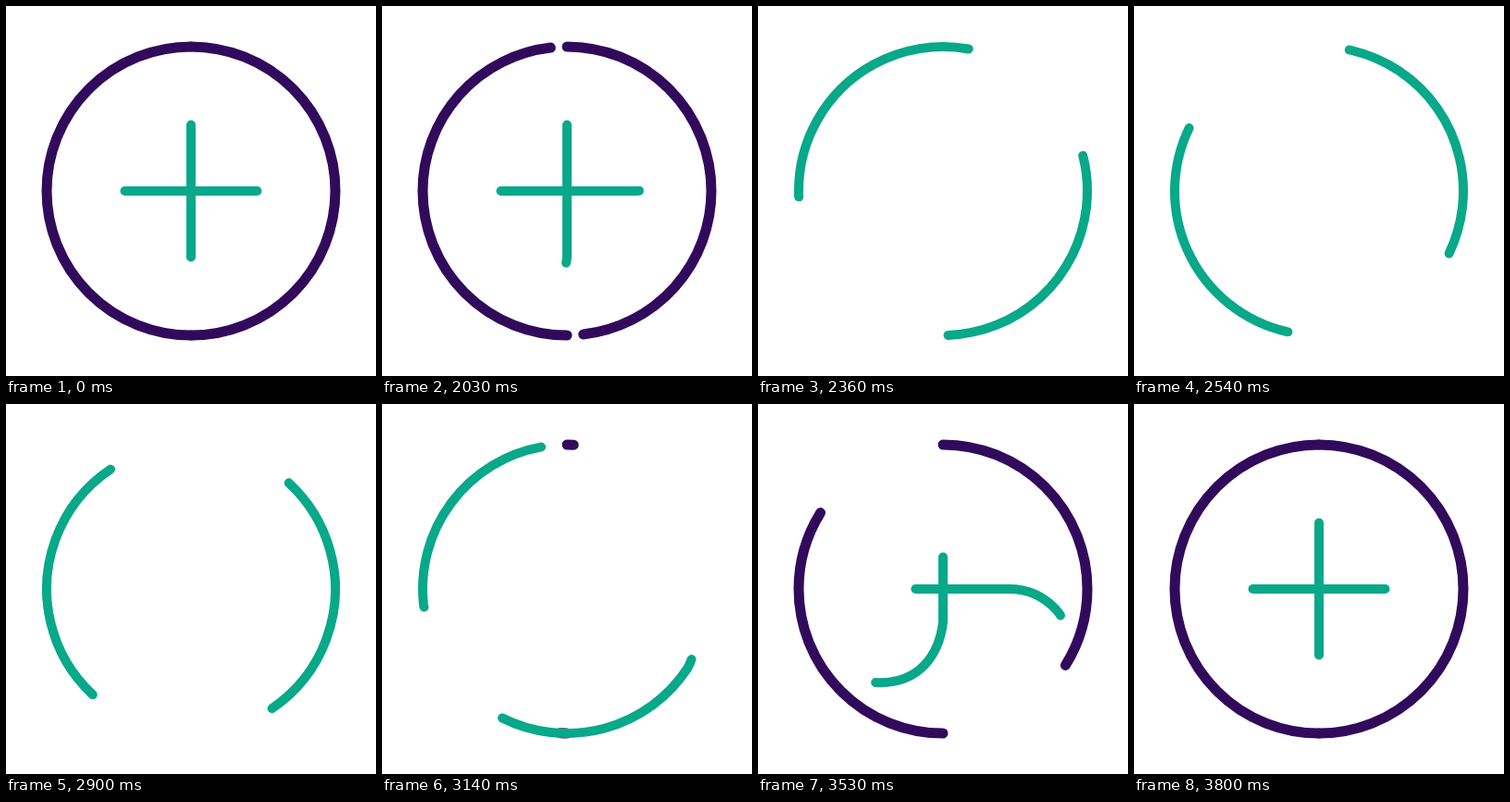
An HTML page that plays this animation: 400x400 px, repeating every 3.83 s.

```html
<!DOCTYPE html>
<html lang="en">
<head>
<meta charset="utf-8">
<title>Plus in a circle</title>
<style>
  html, body { margin: 0; width: 100%; height: 100%; overflow: hidden; background: #fff; }
  svg { display: block; width: 100vw; height: 100vh; }
  path { fill: none; stroke-linecap: round; stroke-linejoin: round; }
  .ring { stroke: #320a5c; stroke-width: 11; }
  .strand { stroke: #08a88a; stroke-width: 10; }
</style>
</head>
<body>
<svg viewBox="0 0 400 400">
  <path class="ring" d="M200 44A156 156 0 0 1 200 356">
  </path>
  <path class="ring" d="M200 356A156 156 0 0 1 200 44"></path>
  <path class="strand"></path>
  <path class="strand"></path>
</svg>
<script>
const LOOP = 3830, HOLD = 2030, STEP = 30, LAST = 60;
const R = 156, RAD = Math.PI / 180, BAR = 143;
const TIMES = [0, 1, 12, 18, 30, 44, LAST];

const rings = document.querySelectorAll('.ring');
const strands = document.querySelectorAll('.strand');
const clamp = x => Math.min(1, Math.max(0, x));
const smooth = x => { x = clamp(x); return x * x * (3 - 2 * x); };

// Angles are clockwise from the top.
const rim = deg => `${200 + R * Math.sin(deg * RAD)} ${200 - R * Math.cos(deg * RAD)}`;

// Counterclockwise run along the rim, in pieces of at most 90 degrees.
function orbit(from, sweep) {
  const n = Math.ceil(sweep / 90);
  let d = '';
  for (let i = 1; i <= n; i++) d += `A${R} ${R} 0 0 0 ${rim(from - sweep * i / n)}`;
  return d;
}

function pathLength(d) {
  const p = document.createElementNS('http://www.w3.org/2000/svg', 'path');
  p.setAttribute('d', d);
  return p.getTotalLength();
}

// Smooth monotone curve through the keys, at rest at both ends.
function through(values, k) {
  const last = TIMES.length - 1;
  let i = 0;
  while (i < last - 1 && k > TIMES[i + 1]) i++;
  const slope = j => (values[j + 1] - values[j]) / (TIMES[j + 1] - TIMES[j]);
  const tangent = j => {
    if (j === 0 || j === last) return 0;
    const a = slope(j - 1), b = slope(j);
    return a * b > 0 ? 2 * a * b / (a + b) : 0;
  };
  const h = TIMES[i + 1] - TIMES[i], u = (k - TIMES[i]) / h, w = 1 - u;
  return values[i] * w * w * (1 + 2 * u) + values[i + 1] * u * u * (3 - 2 * u)
       + h * u * w * (w * tangent(i) - u * tangent(i + 1));
}

// The curve into the upright bar straightens as m goes from 0 to 1.
function intoUpright(m) {
  const p = (x0, y0, x1, y1) => `${x0 + (x1 - x0) * m} ${y0 + (y1 - y0) * m} `;
  return 'C50 245 ' + p(60, 278, 100, 316) + p(105, 280, 150, 322)
       + 'C' + p(165, 282, 185, 325) + p(192, 240, 200, 300) + p(200, 200, 200, 271.5)
       + 'L200 128.5';
}

const intoLevel = () => 'C342 266 338 240 322 222C308 207 290 200 271.5 200L128.5 200';

// turns: degrees travelled on the rim at keys 12, 18 and 30
const routes = [
  {
    open: `M128.5 200L271.5 200C290 200 308 193 322 178C338 160 342 134 ${rim(56.5)}`,
    join: 56.5, sweep: 512.5, close: intoUpright,
    head: [148.7, 223.9, 373.6], tail: [46.2, 120.5, 270.5],
    left: 108, leave: 512.5
  },
  {
    open: `M200 128.5L200 271.5C197 300 170 355 ${rim(180)}`,
    join: 180, sweep: 416.5, close: intoLevel,
    head: [104.1, 167.8, 316.9], tail: [2, 64.3, 213.8],
    left: 115.5, leave: 399.3
  }
];
for (const r of routes) {
  r.base = pathLength(r.open);
  r.body = r.open + orbit(r.join, r.sweep);
}

function trim(path, from, to) {
  path.style.visibility = to > from ? 'visible' : 'hidden';
  path.setAttribute('stroke-dasharray', `${Math.max(0, to - from)} 9999`);
  path.setAttribute('stroke-dashoffset', -from);
}

function drawStrand(path, r, k) {
  path.setAttribute('d', r.body + r.close(smooth((k - 44) / 14)));
  const total = path.getTotalLength();
  const at = deg => r.base + deg * RAD * R;
  const head = [BAR, BAR + 6.5, ...r.head.map(at), total - r.left, total];
  const tail = [0, 0, ...r.tail.map(at), at(r.leave), total - BAR];
  trim(path, through(tail, k), through(head, k));
}

function draw(now) {
  const t = now % LOOP;
  let k = t < HOLD ? 0 : Math.min(LAST, Math.floor((t - HOLD) / STEP) + 1);
  if (k === LAST) k = 0;
  const shown = k < 30 ? 1 - smooth(k / 8.7) : smooth((k - 36.3) / 23.7);
  rings.forEach(p => trim(p, 0, shown < 1 ? shown * Math.PI * R : 9000));
  strands.forEach((p, i) => drawStrand(p, routes[i], k));
}

const start = performance.now();
function tick() {
  draw(performance.now() - start);
  requestAnimationFrame(tick);
}
tick();
</script>
</body>
</html>
```
